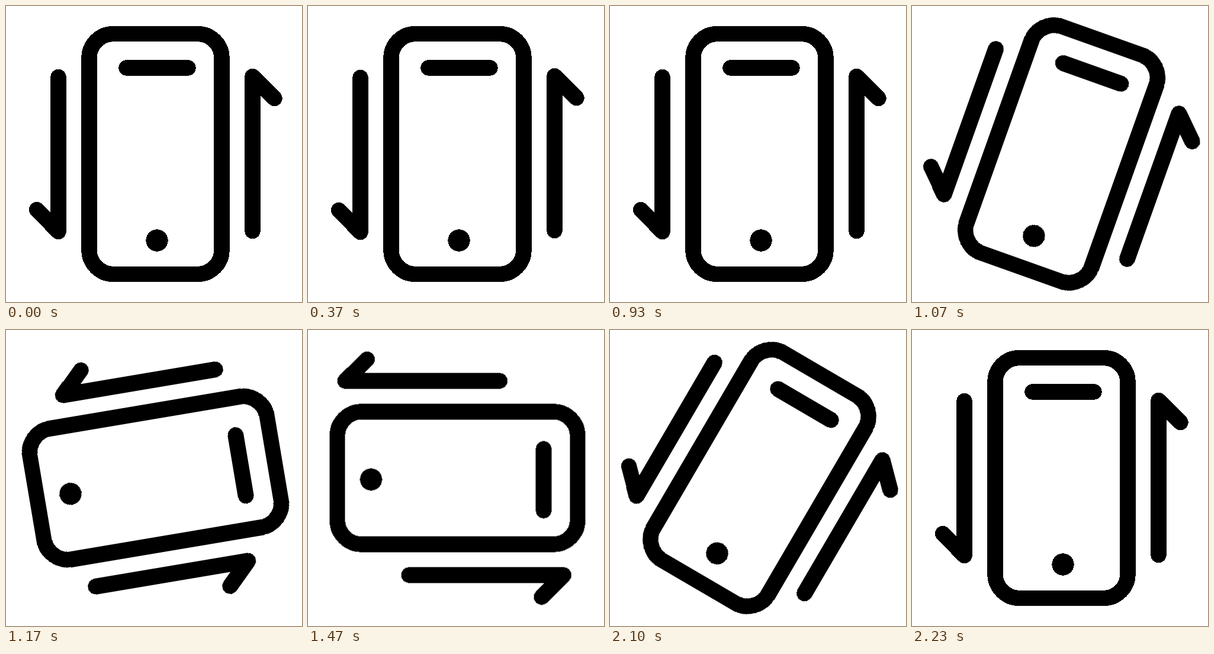
Recreate the animation shown at these times as an HTML page without scripts. Size 500 by 500 pixels, loop 2400 ms.

```html
<!DOCTYPE html>
<html lang="en">
<head>
<meta charset="utf-8">
<title>Rotate phone</title>
<style>
  html, body { margin: 0; width: 100%; height: 100%; overflow: hidden; background: #fff; }
  svg { display: block; width: 100%; height: 100%; shape-rendering: crispEdges; }

  .icon {
    fill: none;
    stroke: #000;
    stroke-width: 26.4;
    stroke-linecap: round;
    stroke-linejoin: round;
    transform-origin: 252.5px 250px;
  }
  .dot { fill: #000; stroke: none; }

  .icon, .arrow {
    animation: turn 2.4s cubic-bezier(.65, 0, .35, 1) infinite;
  }
  .arrow { animation-name: slide; }
  .down { --shift: 61px; }
  .up { --shift: -50px; }

  /* Upright, quarter turn clockwise, back again */
  @keyframes turn {
    0%, 39.75% { transform: rotate(0deg); }
    52.55%, 80.5% { transform: rotate(90deg); }
    93.06%, 100% { transform: rotate(0deg); }
  }

  /* Arrows push out and return once in each position */
  @keyframes slide {
    0%, 13.89% { transform: translateY(0); }
    26.67% { transform: translateY(var(--shift)); }
    39.44%, 51.39% { transform: translateY(0); }
    63.61% { transform: translateY(var(--shift)); }
    80.28%, 100% { transform: translateY(0); }
  }
</style>
</head>
<body>
<svg viewBox="0 0 500 500">
  <g class="icon">
    <rect x="140.5" y="47" width="224" height="406" rx="41"/>
    <path d="M203.5 104.5H307.5"/>
    <circle class="dot" cx="255" cy="396" r="18.7"/>
    <path class="arrow down" d="M88.5 120V381L52 344"/>
    <path class="arrow up" d="M416.5 380V119L453.5 156"/>
  </g>
</svg>
</body>
</html>
```
